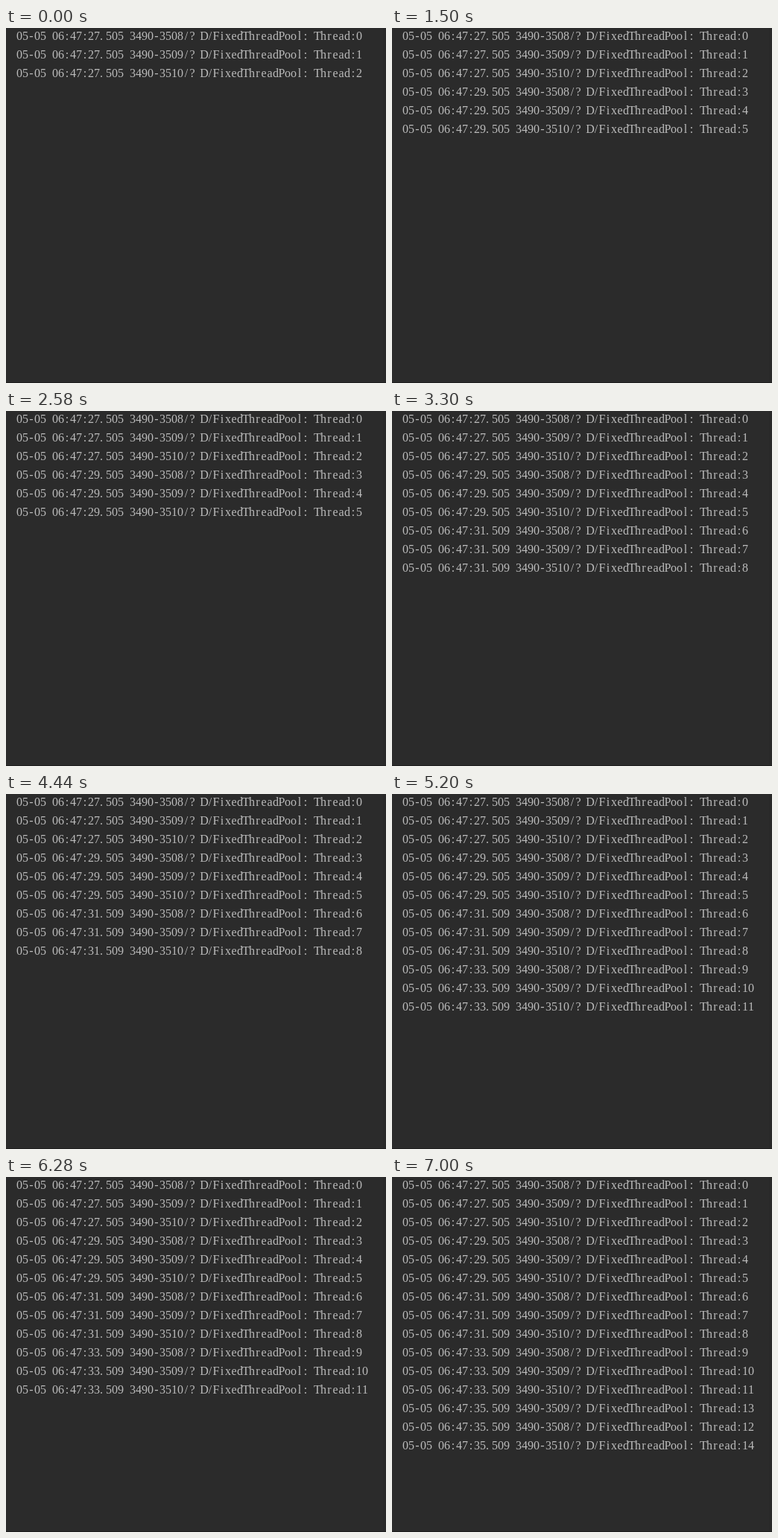
Recreate the animation shown at these times as an HTML page. Size 510 by 477 pixels, loop 8 s.

```html
<!DOCTYPE html>
<html lang="en">
<head>
<meta charset="utf-8">
<title>Thread pool log</title>
<style>
  html, body { margin: 0; width: 100%; height: 100%; overflow: hidden; background: #2b2b2b; }
  svg { display: block; width: 510px; height: 477px; }
  text { font: 16px "Liberation Serif", "Noto Serif", serif; fill: #bbb; text-anchor: middle; }
</style>
</head>
<body>
<svg viewBox="0 0 510 477">
  <rect width="510" height="477" fill="#2b2b2b"/>
  <rect x="506" width="4" height="477" fill="#292929"/>
  <rect y="476" width="510" height="1" fill="#1e1e1e"/>
  <g id="log"></g>
</svg>
<script>
const LOOP = 8000;
const STARTS = [0, 1500, 3300, 5200, 7000];
const LEFT = 14, CELL = 8, BASELINE = 16, LINE = 25;
const NS = "http://www.w3.org/2000/svg";
const log = document.getElementById("log");

// Each batch runs three tasks; the last one finishes out of order.
function message(batch, slot) {
  const worker = batch === 4 ? [1, 0, 2][slot] : slot;
  const millis = batch < 2 ? 505 : 509;
  return `05-05 06:47:${27 + batch * 2}.${millis} 3490-${3508 + worker}/? ` +
    `D/FixedThreadPool: Thread:${batch * 3 + worker}`;
}

// Every character sits in the middle of a fixed console cell.
function addLine(parent, content, row) {
  const line = document.createElementNS(NS, "text");
  const centers = [...content].map((char, i) =>
    LEFT + CELL * (i + 0.5) - (char === "." ? 2 : 0));
  line.setAttribute("x", centers.join(" "));
  line.setAttribute("y", BASELINE + LINE * row);
  line.textContent = content;
  parent.append(line);
}

const batches = STARTS.map((start, batch) => {
  const group = document.createElementNS(NS, "g");
  for (let slot = 0; slot < 3; slot++) {
    addLine(group, message(batch, slot), batch * 3 + slot);
  }
  log.append(group);
  return group;
});

function render(time) {
  batches.forEach((group, i) => {
    group.setAttribute("visibility", time >= STARTS[i] ? "visible" : "hidden");
  });
}

const origin = performance.now();
function tick() {
  render((performance.now() - origin) % LOOP);
  requestAnimationFrame(tick);
}
tick();
</script>
</body>
</html>
```
